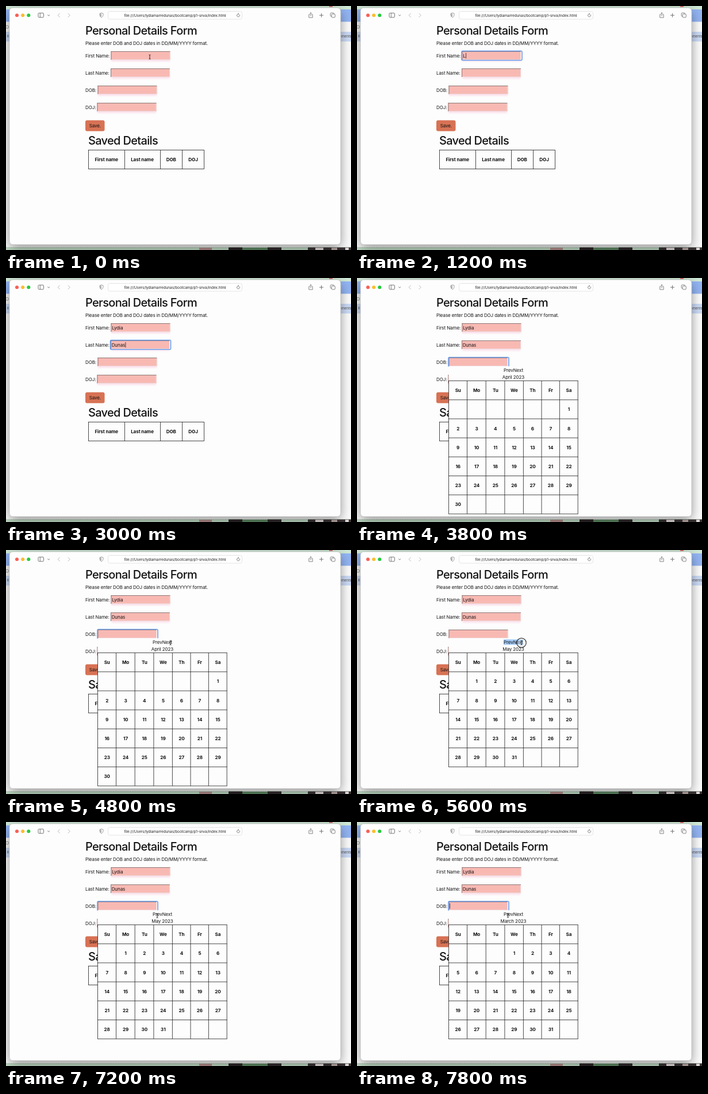
Write an HTML page with a canvas that moves like this. It is 600 by 426 pixels and loops after 8 s.

```html
<!DOCTYPE html>
<html lang="en">
<head>
<meta charset="utf-8">
<title>Personal Details Form</title>
<style>
html, body { margin: 0; width: 100%; height: 100%; overflow: hidden; background: #fff; }
canvas { display: block; width: 600px; height: 426px; }
</style>
</head>
<body>
<canvas id="stage"></canvas>
<script>
const W = 600, H = 426, LOOP = 8000, STEP = 200;
const INK = '#121212', PINK = '#f8b9b3', RULE = '#1c1c1c';
const canvas = document.getElementById('stage');
const ratio = window.devicePixelRatio || 1;
canvas.width = W * ratio;
canvas.height = H * ratio;
const ctx = canvas.getContext('2d');
ctx.scale(ratio, ratio);

const FIRST = 'Lydia', LAST = 'Dunas';
const ADDRESS = 'file:///Users/lydiamarredunas/bootcamp/p1-snva/index.html';
const FIELDS = [
  { label: 'First Name:', x: 182.5, y: 79 },
  { label: 'Last Name:', x: 182, y: 109 },
  { label: 'DOB:', x: 159.5, y: 139 },
  { label: 'DOJ:', x: 158.5, y: 169 }
];
const COLS = [159.5, 191.5, 224.2, 256.9, 289.4, 321, 352.4, 384.2];
const MONTHS = ['January', 'February', 'March', 'April', 'May', 'June', 'July'];

// [start time, value]
const FIRST_KEYS = [[0, 0], [1200, 1], [1400, 2], [1600, 3], [1800, 4], [2000, 5]];
const LAST_KEYS = [[0, 0], [2200, 1], [2400, 2], [2600, 3], [2800, 4], [3000, 5]];
const FOCUS = [[0, -1], [600, 0], [2200, 1], [3400, 2], [5600, -1], [5800, 2]];
const MONTH = [[0, -1], [3400, 3], [5400, 4], [5800, 5], [6200, 6], [6800, 5], [7000, 4], [7400, 3], [7600, 2]];
const PRESS = [600, 5200, 5600, 6000, 6800, 7000, 7400];
// [time, x, y]
const PATH = [[4000, 250, 89], [4400, 282, 190], [4800, 286, 162], [6200, 286, 162], [6600, 263.5, 164], [7800, 262.5, 163]];

const at = (keys, t) => keys.reduce((v, k) => t >= k[0] ? k[1] : v, keys[0][1]);

function rect(x, y, w, h, fill) {
  ctx.fillStyle = fill;
  ctx.fillRect(x, y, w, h);
}

function round(x, y, w, h, r, fill, stroke, lw = 1) {
  ctx.beginPath();
  ctx.roundRect(x, y, w, h, r);
  if (fill) { ctx.fillStyle = fill; ctx.fill(); }
  if (stroke) { ctx.strokeStyle = stroke; ctx.lineWidth = lw; ctx.stroke(); }
}

function dot(x, y, r, fill) {
  ctx.beginPath();
  ctx.arc(x, y, r, 0, 7);
  ctx.fillStyle = fill;
  ctx.fill();
}

function line(points, color, lw = 1) {
  ctx.beginPath();
  points.forEach(([x, y], i) => i ? ctx.lineTo(x, y) : ctx.moveTo(x, y));
  ctx.strokeStyle = color;
  ctx.lineWidth = lw;
  ctx.stroke();
}

function text(s, x, y, { size = 8, weight = 400, align = 'left', color = INK, track = -0.1 } = {}) {
  ctx.font = `${weight} ${size}px Inter, sans-serif`;
  ctx.letterSpacing = track + 'px';
  ctx.textAlign = align;
  ctx.fillStyle = color;
  ctx.fillText(s, x, y);
}

const heading = (s, x, y) => text(s, x, y, { size: 20, weight: 500, track: -0.68 });
const boldCell = (s, x, y) => text(s, x, y, { size: 8.1, weight: 700, align: 'center' });

function shadow(color, blur, dy, draw) {
  ctx.save();
  ctx.shadowColor = color;
  ctx.shadowBlur = blur * ratio;
  ctx.shadowOffsetY = dy * ratio;
  draw();
  ctx.restore();
}

function desktop() {
  rect(0, 0, W, H, '#fcfcfc');
  rect(0, 0, W, 6, '#d0e8d6');
  rect(562, 0, 6, 1.5, '#d9534c');
  rect(0, 6, W, 21.5, '#93b5f3');
  rect(0, 45, W, 17, '#cddcf7');
  ctx.beginPath();
  ctx.arc(2, 36.5, 2.5, 0, 7);
  ctx.strokeStyle = '#777';
  ctx.lineWidth = 0.8;
  ctx.stroke();
  text('K', 2, 54.5, { size: 5.5, color: '#555' });
  text('comments', 600.5, 54.5, { size: 6, align: 'right', color: '#555' });

  rect(0, 421.5, W, 5, '#bfdcc4');
  for (let x = 0; x < W; x += 3) rect(x, 421, 1.5, 0.8, '#8fa596');
  rect(336, 422, 22, 4, '#b58f8b');
  rect(387, 421.5, 24, 5, '#2b2528');
  rect(411, 422, 44, 4, '#5f8a63');
  rect(455, 421.5, 24, 5, '#302a2c');
  rect(525, 421.5, 75, 5, '#3a3436');
  rect(538, 422, 14, 4, '#e3dcda');
  rect(566, 422, 10, 4, '#b9a7a3');
  rect(590, 422, 6, 4, '#ded8d6');
}

function toolbar() {
  [['#f95f57', 19], ['#fbbd2e', 29.2], ['#29c840', 39.3]].forEach(([c, x]) => dot(x, 16.3, 3, c));
  const gray = '#666', pale = '#bbb';
  round(56, 12.3, 9.5, 7.6, 1.5, null, gray, 0.9);
  line([[59.3, 12.3], [59.3, 19.9]], gray, 0.8);
  line([[72.3, 15.3], [74.2, 17.2], [76.1, 15.3]], gray, 0.9);
  line([[93.7, 12.7], [90.2, 16.2], [93.7, 19.7]], pale);
  line([[107.7, 12.7], [111.2, 16.2], [107.7, 19.7]], pale);

  ctx.beginPath();
  ctx.moveTo(166, 12);
  ctx.lineTo(169, 13.1);
  ctx.quadraticCurveTo(169.6, 18, 166, 20.2);
  ctx.quadraticCurveTo(162.4, 18, 163, 13.1);
  ctx.closePath();
  ctx.strokeStyle = '#888';
  ctx.lineWidth = 0.8;
  ctx.stroke();
  rect(163.2, 13.4, 2.8, 5, '#b0b0b0');

  round(177.5, 9.5, 233, 13.5, 3, '#fff', '#e1e1e1', 0.9);
  text(ADDRESS, 294, 18.8, { size: 6.55, align: 'center', color: '#2a2a2a', track: -0.13 });
  ctx.beginPath();
  ctx.arc(404, 16.4, 2.5, -0.6, 4.9);
  ctx.strokeStyle = gray;
  ctx.lineWidth = 0.8;
  ctx.stroke();
  line([[403.5, 12.3], [405.1, 13.8], [403.5, 15.2]], gray, 0.8);

  line([[528.5, 14.8], [526.8, 14.8], [526.8, 20.2], [533.2, 20.2], [533.2, 14.8], [531.5, 14.8]], gray, 0.8);
  line([[530, 17.5], [530, 11.5]], gray, 0.8);
  line([[528.3, 13.2], [530, 11.5], [531.7, 13.2]], gray, 0.8);
  line([[545, 16.2], [552, 16.2]], gray, 0.9);
  line([[548.5, 12.7], [548.5, 19.7]], gray, 0.9);
  round(564.2, 12, 6, 6, 1.3, null, gray, 0.8);
  round(566.3, 14, 6, 6, 1.3, '#fdfdfd', gray, 0.8);
}

function browser() {
  shadow('rgba(0,0,0,.42)', 20, 6, () => round(6, 3, 576, 413.5, 6, '#fdfdfd'));
  round(6, 3, 576, 413.5, 6, '#fdfdfd', '#b7b9b8', 0.7);
  toolbar();
}

function field({ label, x, y }, value, focused, caret) {
  text(label, 138, y + 10.5);
  shadow('rgba(245,165,200,.38)', 3, 2.5, () => rect(x + 0.5, y, 102, 15, PINK));
  rect(x, y, 103, 15, PINK);
  rect(x, y, 103, 1, '#8b7774');
  rect(x, y, 1, 15, '#8b7774');
  rect(x + 102, y + 1, 1, 14, '#eed5d3');
  rect(x + 1, y + 14, 102, 1, '#eed5d3');
  if (focused) {
    rect(x + 102.3, y, 2, 15.5, '#fdfdfd');
    round(x - 0.5, y - 0.5, 105, 16.3, 1.5, null, '#6b9cec', 1.6);
  }
  text(value, x + 1.7, y + 10.5);
  if (caret) {
    const w = value ? ctx.measureText(value).width + 0.4 : 0;
    rect(x + 1.7 + w, y + 3, 0.8, 9.5, '#222');
  }
}

function savedTable() {
  heading('Saved Details', 143, 242.3);
  ctx.strokeStyle = RULE;
  ctx.lineWidth = 0.8;
  ctx.strokeRect(143.5, 251.5, 201, 33);
  [206.5, 268.5, 306.5].forEach(x => line([[x, 251.5], [x, 284.5]], RULE, 0.8));
  [['First name', 174.7], ['Last name', 237], ['DOB', 287.3], ['DOJ', 325.6]].forEach(
    ([s, x]) => boldCell(s, x, 271.2));
}

function calendar(month, selected) {
  const lead = new Date(Date.UTC(2023, month, 1)).getUTCDay();
  const days = new Date(Date.UTC(2023, month + 1, 0)).getUTCDate();
  const rows = 1 + Math.ceil((lead + days) / 7);
  const rowY = r => 179.5 + r * 33.2;
  const bottom = rowY(rows);

  rect(159.5, 154, 225, bottom - 154, '#fdfdfd');
  if (selected) rect(255, 156, 34, 9.5, '#a6cdf9');
  text('PrevNext', 272, 163.7, { align: 'center' });
  text(MONTHS[month] + ' 2023', 272, 176, { align: 'center' });

  for (let r = 0; r <= rows; r++) line([[159, rowY(r)], [384.6, rowY(r)]], RULE, 0.8);
  COLS.forEach(x => line([[x, 179.5], [x, bottom]], RULE, 0.8));

  const cell = (s, c, r) => boldCell(s, (COLS[c] + COLS[c + 1]) / 2 + 0.2, rowY(r) + 19.7);
  ['Su', 'Mo', 'Tu', 'We', 'Th', 'Fr', 'Sa'].forEach((s, c) => cell(s, c, 0));
  for (let d = 1; d <= days; d++) {
    const i = lead + d - 1;
    cell(d, i % 7, 1 + Math.floor(i / 7));
  }
}

function pointerAt(t) {
  const i = PATH.findIndex(p => p[0] > t);
  if (i < 1) return PATH[i < 0 ? PATH.length - 1 : 0].slice(1);
  const a = PATH[i - 1], b = PATH[i];
  const u = (t - a[0]) / (b[0] - a[0]);
  const e = u * u * (3 - 2 * u);
  return [a[1] + (b[1] - a[1]) * e, a[2] + (b[2] - a[2]) * e];
}

function pointer(t) {
  // hidden while typing
  if (t > 800 && t < 4000) return;
  const [x, y] = pointerAt(t);
  if (PRESS.includes(t)) {
    ctx.beginPath();
    ctx.arc(x, y, 8.2, 0, 7);
    ctx.fillStyle = 'rgba(255,255,255,.25)';
    ctx.fill();
    ctx.strokeStyle = '#333';
    ctx.lineWidth = 1.2;
    ctx.stroke();
  }
  line([[x, y - 3.5], [x, y + 3.5]], '#222', 1);
  line([[x - 1.6, y - 4], [x, y - 3.3], [x + 1.6, y - 4]], '#222', 0.8);
  line([[x - 1.6, y + 4], [x, y + 3.3], [x + 1.6, y + 4]], '#222', 0.8);
}

function draw(t) {
  const focus = at(FOCUS, t), month = at(MONTH, t);
  const values = [FIRST.slice(0, at(FIRST_KEYS, t)), LAST.slice(0, at(LAST_KEYS, t)), '', ''];
  const caret = t <= 3400 || (t > 4000 && t < 4600) || t >= 7600;

  desktop();
  browser();
  heading('Personal Details Form', 138, 49.6);
  text('Please enter DOB and DOJ dates in DD/MM/YYYY format.', 138, 67.6);
  FIELDS.forEach((f, i) => field(f, values[i], i === focus, i === focus && caret));
  round(138, 199.5, 33.5, 19, 3, '#d77254');
  text('Save.', 154.8, 212.2, { align: 'center' });
  savedTable();
  if (month >= 0) calendar(month, t === 5600);
  pointer(t);
}

const start = performance.now();
function tick() {
  const t = (performance.now() - start) % LOOP;
  draw(Math.floor(t / STEP) * STEP);
  requestAnimationFrame(tick);
}
tick();
</script>
</body>
</html>
```
